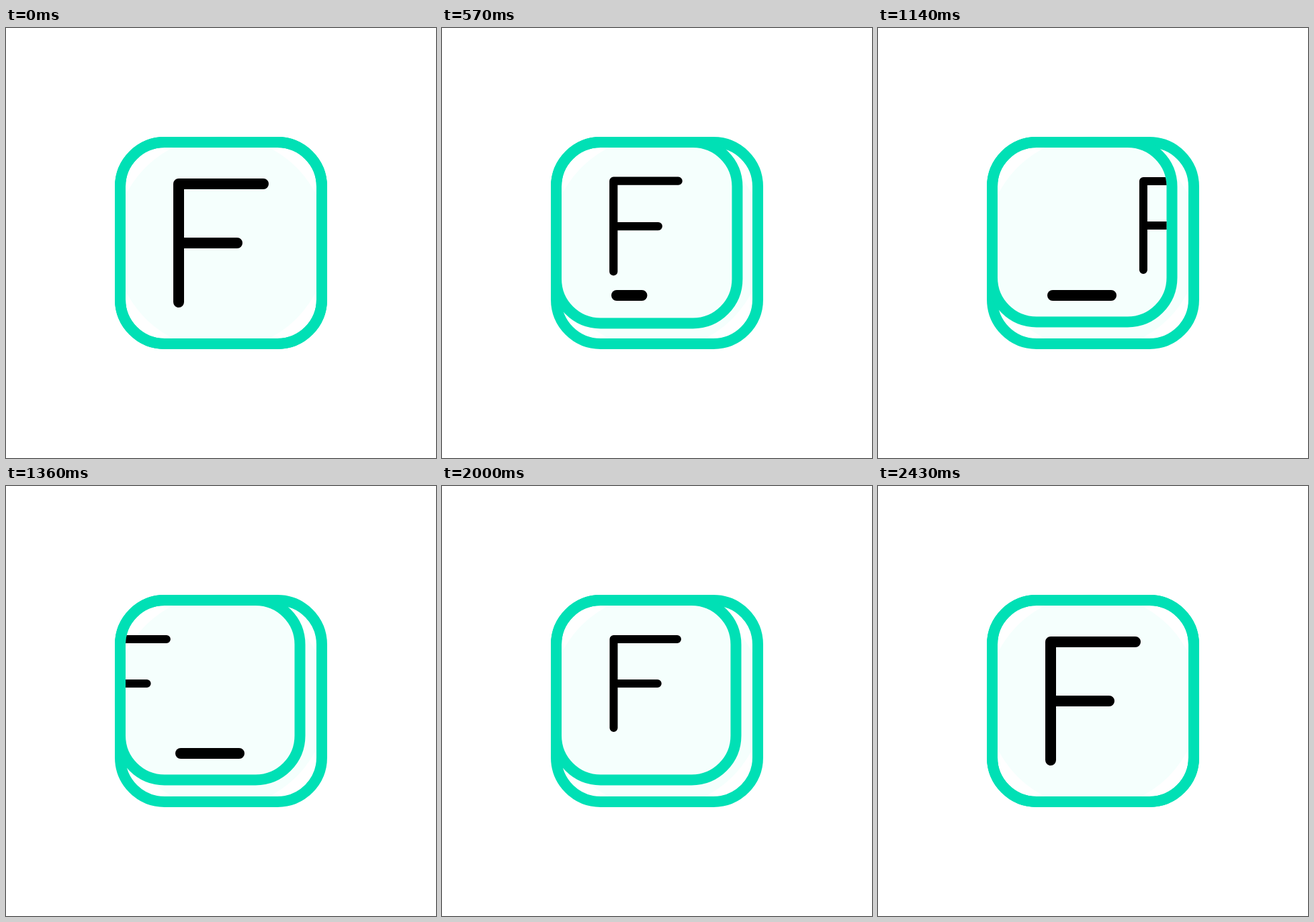
An HTML page for the animation above (2780 ms loop, 640 px wide and 640 px high).

```html
<!DOCTYPE html>
<html lang="en">
<head>
<meta charset="utf-8">
<style>
  html, body { margin: 0; width: 100%; height: 100%; overflow: hidden; background: #fff; }
  svg { display: block; width: 100vw; height: 100vh; }
  .stroke { fill: none; stroke: #000; stroke-width: 16; stroke-linecap: round; stroke-linejoin: round; }
  .frame { stroke: #00e0b5; }
</style>
</head>
<body>
<svg viewBox="0 0 640 640">
  <clipPath id="inside"><rect id="window" x="178" y="178" rx="58"/></clipPath>
  <circle cx="320" cy="320" r="159" fill="#f5fffd"/>
  <rect class="stroke frame" x="170" y="170" width="300" height="300" rx="66"/>
  <rect class="stroke frame" id="panel" x="170" y="170" rx="66"/>
  <g clip-path="url(#inside)">
    <path class="stroke" id="letter" d="M0 176V0H126M0 88H87"/>
  </g>
  <path class="stroke" id="underline"/>
</svg>
<script>
const LOOP = 2780, FPS = 14, WRAP = 360;
const [hole, panel, letter, underline] =
  ['window', 'panel', 'letter', 'underline'].map(id => document.getElementById(id));

const progress = (n, from, to) => Math.min(1, Math.max(0, (n - from) / (to - from)));
const easeInOut = u => (1 - Math.cos(Math.PI * u)) / 2;
const easeOut = u => Math.sin(Math.PI * u / 2);
const lerp = (a, b, u) => a + (b - a) * u;

function setSize(rect, size) {
  rect.setAttribute('width', size);
  rect.setAttribute('height', size);
}

// n counts animation steps at FPS
function draw(n) {
  const shrink = easeOut(progress(n, 0, 10.3)) - easeInOut(progress(n, 29.7, 34));
  const size = lerp(300, 267.5, shrink);
  setSize(panel, size);
  setSize(hole, size - 16);

  // The letter leaves on the right and returns from the left
  let slide = WRAP * easeInOut(progress(n, 9.5, 24.7));
  if (slide > WRAP / 2) slide -= WRAP;
  const lift = Math.sin(Math.PI * shrink);
  const x = lerp(257, 255.5, shrink) - 1.7 * lift + slide;
  const y = lerp(232, 228, shrink) - 2.8 * lift;
  letter.setAttribute('transform', `translate(${x} ${y}) scale(${lerp(1, 0.75, shrink)})`);

  const start = easeInOut(progress(n, 20.4, 27.6));
  const end = easeInOut(progress(n, 4.9, 11.7));
  underline.setAttribute('d', end > start ? `M${260 + 87 * start} 398H${260 + 87 * end}` : '');
}

function tick() {
  const time = performance.now() % LOOP;
  draw(Math.floor((time + 5) * FPS / 1000));
  requestAnimationFrame(tick);
}
tick();
</script>
</body>
</html>
```
